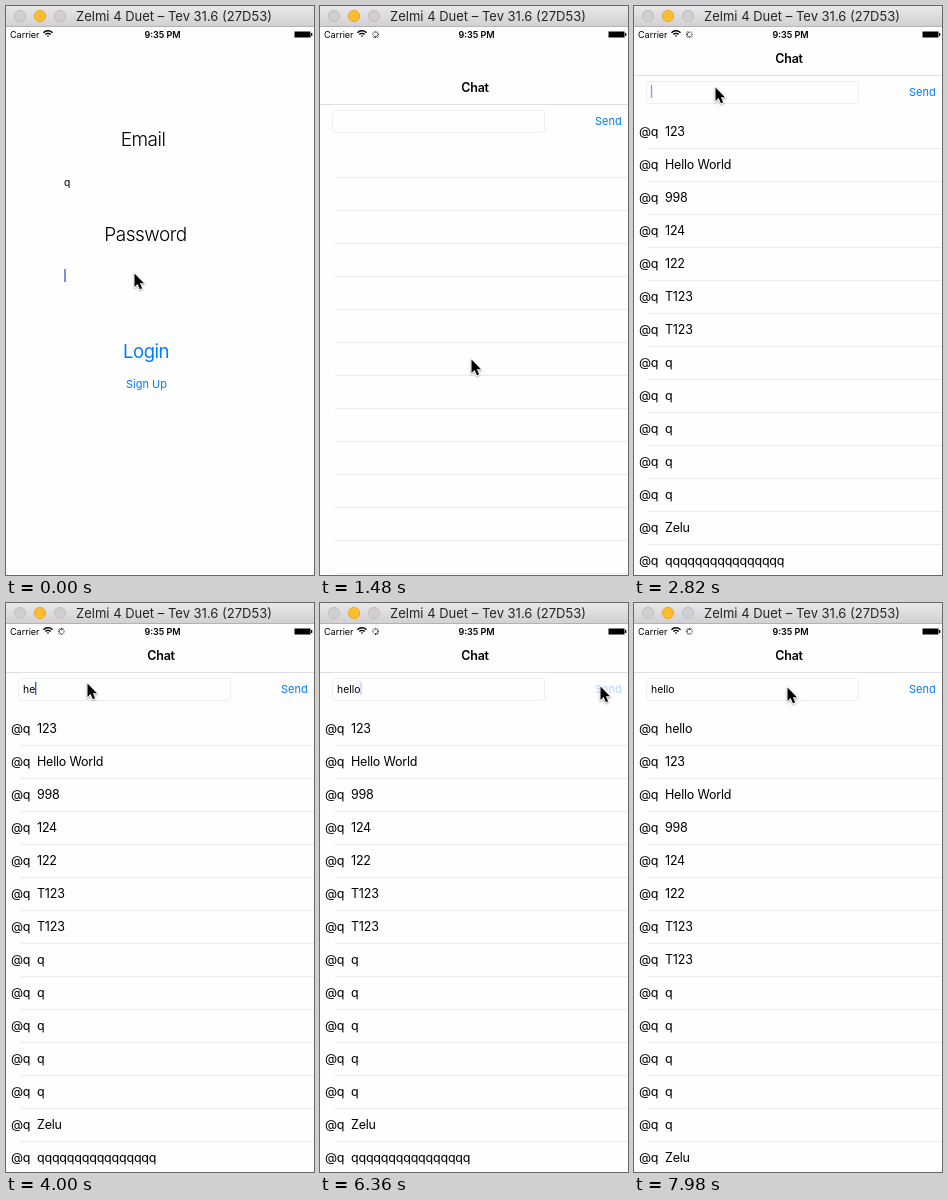
An HTML page with a canvas that plays this animation: 308x569 px, repeating every 8000 ms.

```html
<!DOCTYPE html>
<html lang="en">
<head>
<meta charset="utf-8">
<title>Chat login</title>
<style>
  html, body { margin: 0; width: 100%; height: 100%; overflow: hidden; background: #fefefe; }
  canvas { display: block; }
</style>
</head>
<body>
<canvas id="stage" width="308" height="569"></canvas>
<script>
const ctx = document.getElementById('stage').getContext('2d');
const W = 308, H = 569, LOOP = 8000, STEP = 147.8;
const BLUE = '#007aff', CARET = '#4263cf', PAPER = '#fefefe';

const messages = ['123', 'Hello World', '998', '124', '122', 'T123', 'T123',
  'q', 'q', 'q', 'q', 'q', 'Zelu', 'q'.repeat(16)];

// Pointer stops: time, x, y
const pointerPath = [
  [0, 128, 267], [150, 128, 268], [440, 137, 305], [880, 151, 353], [1480, 151, 353],
  [1625, 145, 332], [1773, 129, 288], [1920, 104, 190], [2070, 86, 108], [2217, 81, 81],
  [5330, 81, 80], [5480, 97, 88], [5770, 185, 106], [6060, 268, 90], [6205, 280, 83],
  [6640, 280, 83], [6950, 228, 90], [7240, 160, 86], [7380, 153, 84]
];

// Times at which each letter of the message is typed
const keyTimes = [3830, 3980, 4270, 4560, 4860];

function text(str, x, y, size, { color = '#000', weight = 400, align = 'left', spacing = 0 } = {}) {
  ctx.font = `${weight} ${size}px Inter, sans-serif`;
  ctx.letterSpacing = spacing + 'px';
  ctx.textAlign = align;
  ctx.fillStyle = color;
  ctx.fillText(str, x, y);
}

function rect(x, y, w, h, color) {
  ctx.fillStyle = color;
  ctx.fillRect(x, y, w, h);
}

function withAlpha(alpha, draw) {
  ctx.save();
  ctx.globalAlpha = alpha;
  draw();
  ctx.restore();
}

const clamp = v => Math.max(0, Math.min(1, v));

function blink(t) {
  const p = t / 1000 % 1;
  return clamp(Math.min(p - 0.31, 0.9 - p) / 0.15);
}

function caret(x, y, alpha) {
  withAlpha(alpha, () => rect(x, y, 1.4, 13, CARET));
}

function titleBar() {
  const fill = ctx.createLinearGradient(0, 0, 0, 20);
  fill.addColorStop(0, '#e9e7e9');
  fill.addColorStop(1, '#d2d0d2');
  rect(0, 0, W, 20, fill);
  rect(0, 20, W, 1, '#b4b2b4');
  [['#d0ced0', '#bcbabc'], ['#fdbd2e', '#e2a32a'], ['#d0ced0', '#bcbabc']].forEach(([color, edge], i) => {
    ctx.beginPath();
    ctx.arc(14 + 20 * i, 10, 5.7, 0, 7);
    ctx.fillStyle = color;
    ctx.fill();
    ctx.lineWidth = 0.8;
    ctx.strokeStyle = edge;
    ctx.stroke();
  });
  text('Zelmi 4 Duet – Tev 31.6 (27D53)', 168, 15, 13, { color: '#262526', align: 'center' });
}

function spinner(t) {
  const lead = Math.floor(t / 1000 * 12);
  ctx.lineWidth = 1;
  ctx.strokeStyle = '#111';
  for (let i = 0; i < 12; i++) {
    const a = i * Math.PI / 6, c = Math.cos(a), s = Math.sin(a);
    withAlpha(0.35 + 0.6 * ((i - lead + 1200) % 12) / 11, () => {
      ctx.beginPath();
      ctx.moveTo(55.5 + 1.8 * c, 28.5 + 1.8 * s);
      ctx.lineTo(55.5 + 3.6 * c, 28.5 + 3.6 * s);
      ctx.stroke();
    });
  }
}

function statusBar(t) {
  text('Carrier', 4, 32, 9);
  text('9:35 PM', 156.5, 32, 9, { weight: 600, align: 'center' });
  ctx.strokeStyle = '#000';
  ctx.lineWidth = 1.4;
  for (const r of [1, 3.6, 6.2]) {
    ctx.beginPath();
    ctx.arc(42, 31, r, -Math.PI * 0.76, -Math.PI * 0.24);
    ctx.stroke();
  }
  rect(288.5, 25.5, 16, 6, '#000');
  rect(305, 27, 1.3, 3, '#000');
  if (t > 1300) spinner(t);
}

function loginScreen(t) {
  const heading = { weight: 300, align: 'center', spacing: -0.5 };
  text('Email', 137, 139.5, 19, heading);
  text('q', 58, 180, 10.4);
  text('Password', 139.5, 235, 19, heading);
  caret(58.3, 263, blink(t + 500));
  withAlpha(t > 1170 ? 0.25 : 1, () =>
    text('Login', 140, 351.5, 18.5, { ...heading, weight: 400, color: BLUE }));
  text('Sign Up', 140.5, 382, 11, { color: BLUE, align: 'center' });
}

function chatScreen(t) {
  rect(0, 21, W, H, PAPER);
  text('Chat', 155, 57, 12.5, { weight: 600, align: 'center', spacing: -0.2 });
  rect(0, 69, W, 1, '#dfdfe1');

  ctx.beginPath();
  ctx.roundRect(12.5, 75.5, 212, 22, 3);
  ctx.lineWidth = 1;
  ctx.strokeStyle = '#eeeeef';
  ctx.stroke();

  const typed = 'hello'.slice(0, keyTimes.filter(k => t >= k).length);
  text(typed, 17, 89.5, 10.4);
  const width = ctx.measureText(typed).width;
  const typing = t > 3820 && t < 5000;
  if (t > 2800) caret(16.8 + width, 79, typing ? 1 : blink(t));

  withAlpha(t > 6340 && t < 6490 ? 0.3 : 1, () => text('Send', 275, 90, 11, { color: BLUE }));

  const rows = t < 1760 ? [] : t < 6640 ? messages : ['hello', ...messages];
  for (let i = 0; i < 14; i++) {
    const y = 130 + 33 * i;
    rect(15, 142 + 33 * i, W, 1, '#ebebed');
    if (!rows[i]) continue;
    text('@q', 5, y, 12.5, { spacing: -0.2 });
    text(rows[i], 31, y, 12.5, { spacing: -0.2 });
  }
}

function pointerAt(t) {
  const next = pointerPath.findIndex(p => p[0] > t);
  if (next < 0) return pointerPath.at(-1).slice(1);
  const [t0, x0, y0] = pointerPath[next - 1], [t1, x1, y1] = pointerPath[next];
  const k = (t - t0) / (t1 - t0);
  return [x0 + (x1 - x0) * k, y0 + (y1 - y0) * k];
}

const arrow = new Path2D('M.5 .5V14L3.6 11.1L5.9 16.3L8.1 15.3L5.9 10.2H10Z');

function pointer(t) {
  ctx.save();
  ctx.translate(...pointerAt(t).map(Math.round));
  ctx.shadowColor = 'rgba(0,0,0,.35)';
  ctx.shadowBlur = 2;
  ctx.shadowOffsetY = 1;
  ctx.lineWidth = 1.6;
  ctx.strokeStyle = '#fff';
  ctx.stroke(arrow);
  ctx.shadowColor = 'transparent';
  ctx.fillStyle = '#000';
  ctx.fill(arrow);
  ctx.restore();
}

// The sheet rises on a critically damped spring
function sheetOffset(t) {
  const x = Math.max(0, t - 1222) / 1000 * 18.26;
  return Math.floor(548 * (1 + x) * Math.exp(-x));
}

function render(now) {
  const t = Math.floor((now % LOOP + 10) / STEP) * STEP;
  rect(0, 0, W, H, PAPER);
  if (t < 1700) loginScreen(t);
  if (t > 1222) {
    ctx.save();
    ctx.translate(0, sheetOffset(t));
    chatScreen(t);
    ctx.restore();
  }
  statusBar(t);
  titleBar();
  pointer(t);
}

const start = performance.now();
(function tick() {
  render(performance.now() - start);
  requestAnimationFrame(tick);
})();
</script>
</body>
</html>
```
